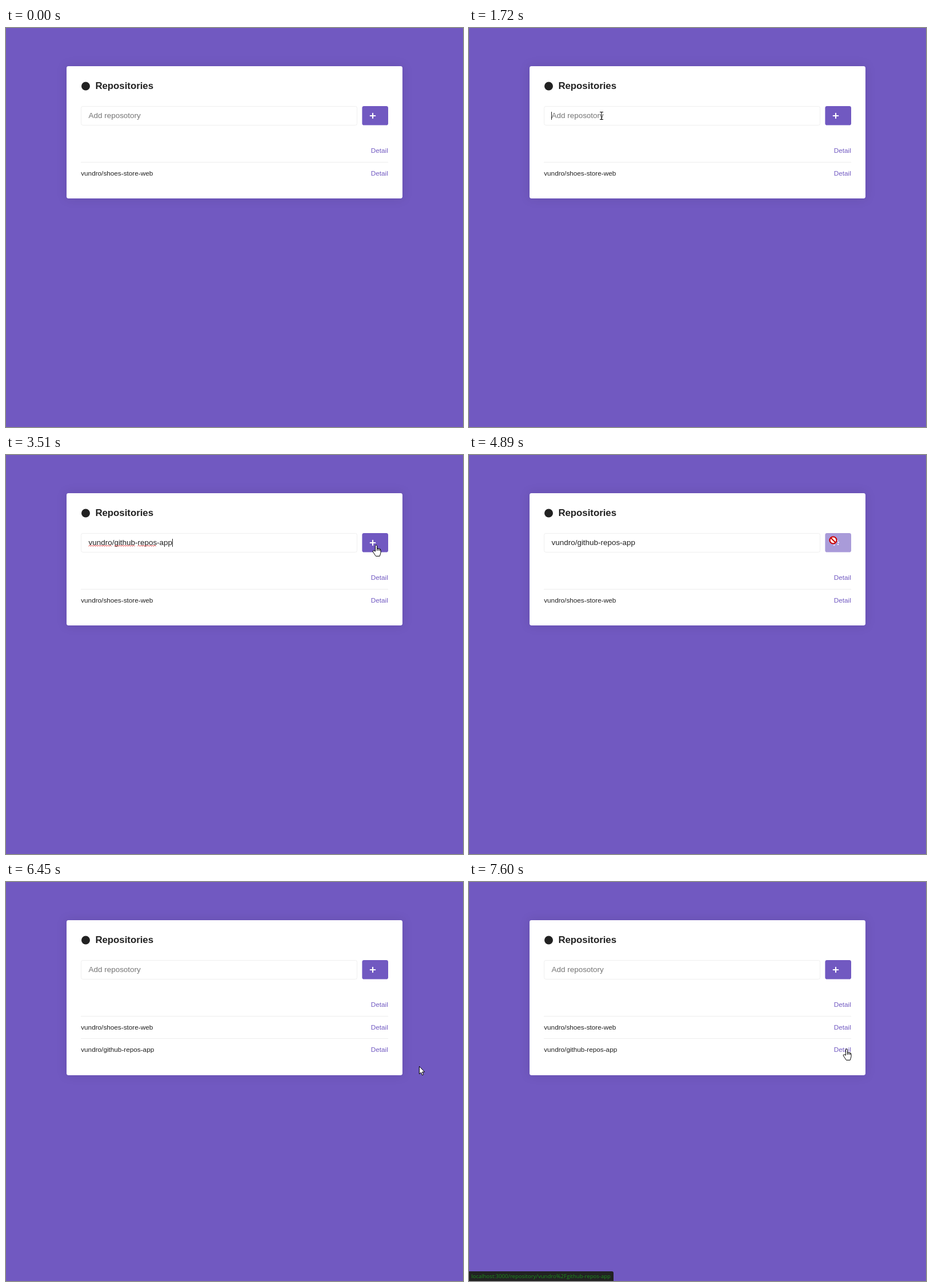
These frames come from a looping animation (800 by 700 pixels, 8000 ms). An HTML page:

```html
<!DOCTYPE html>
<html lang="en">
<head>
<meta charset="utf-8">
<title>Repositories</title>
<style>
  html, body { margin: 0; width: 100%; height: 100%; overflow: hidden; background: #7159c1; }
  svg { display: block; font-family: "Liberation Sans", Arial, sans-serif; fill: #222; }
  #card { fill: #fff; filter: drop-shadow(0 0 8.4px rgba(0, 0, 0, .1)); }
  .title { font-size: 16.8px; font-weight: bold; }
  .field { font-size: 13.44px; }
  .row { font-size: 11.76px; }
  .link, #button { fill: #7159c1; }
  .link { text-anchor: end; }
  .line { fill: #eee; }
  #squiggle { fill: none; stroke: #e33; }
  #pointer path { fill: #fff; stroke: #000; stroke-linejoin: round; }
  #status text { font: 9.55px "Open Sans", "Noto Sans", sans-serif; fill: #1b8c1b; }
</style>
</head>
<body>
<svg width="800" height="700" viewBox="0 0 800 700">
  <rect id="card" x="106" y="67" width="588" rx="3.4"/>
  <circle cx="139.5" cy="102" r="7.5"/>
  <text class="title" x="156.4" y="107">Repositories</text>

  <rect x="131.5" y="137.5" width="483" height="33" rx="3" fill="#fff" stroke="#eee"/>
  <text id="field" class="field" x="144.6" y="158"></text>
  <path id="squiggle"/>
  <rect id="caret" y="147" width="1" height="14"/>

  <g id="submit">
    <rect id="button" x="623.4" y="137" width="45.6" height="33.6" rx="3.4"/>
    <path id="plus" d="M637.7 154h8.6M642 149.7v8.6" stroke="#fff" stroke-width="2.1" stroke-linecap="round"/>
    <g id="spinner" fill="#fff"></g>
  </g>

  <g id="rows"></g>
  <g id="status">
    <path d="M0 683H250a3 3 0 0 1 3 3V700H0Z"/>
    <text x="4" y="695">localhost:3000/repository/vundro%2Fgithub-repos-app</text>
  </g>

  <g id="pointer">
    <path id="arrow" d="M.5 .5V14L3.5 11 5.6 15.8 7.8 14.8 5.7 10.2H9.8Z"/>
    <path id="hand" d="M-1.5 11V1.5a1.5 1.5 0 0 1 3 0V6.3H5.5Q8 7 8 9V13.5L6.2 19.5H-.6L-5.5 12a1.5 1.5 0 0 1 2.4-1.8ZM1.5 6V10M4 6.5V10M6.3 7V10"/>
    <path id="beam" style="fill:none" d="M-3-6.5H3M0-6.5V6.5M-3 6.5H3"/>
    <g id="denied" transform="translate(-.5 -.5)" fill="#fff" stroke="#c00" stroke-width="2.2">
      <circle r="6"/><path d="M-4.2-4.2 4.2 4.2" style="stroke:#c00"/>
    </g>
  </g>
</svg>
<script>
const $ = id => document.getElementById(id);
const show = (id, on) => $(id).style.display = on ? "" : "none";
const LOOP = 8000, STEP = 77, BLINK = 500;
const ENTER = 300, FOCUS = 1240, PASTE = 2270, REFOCUS = 3360;
const BLUR = 4200, FADE = 4350, DONE = 4980, HOVER = 7510;
const REPO = "vundro/github-repos-app";

// Pointer moves: start, end, and the place reached
const moves = [
  [ENTER, 920, 209, 149], [1030, 1090, 232, 154],
  [2580, 2870, 579, 185], [2870, 3190, 665, 157],
  [REFOCUS, 3510, 648, 158], [3510, 3740, 638, 150],
  [5810, 6450, 723, 323], [6450, 6590, 708, 322], [6980, 7450, 661, 293]
];

const wave = (x, end) => {
  let d = `M${x} 160`;
  for (let i = 1; x + i * 2 <= end; i++) d += `l2 ${i % 2 ? -1.5 : 1.5}`;
  return d;
};
$("squiggle").setAttribute("d", wave(144.5, 186) + wave(189.5, 226) + wave(230.5, 264));

// Seven dots, leaving the upper right place empty
for (let i = 0; i < 7; i++)
  $("spinner").innerHTML += `<circle cx="4.9" r="1.1" transform="rotate(${i * 45})"/>`;

$("rows").innerHTML = ["", "vundro/shoes-store-web", REPO].map((name, i) => {
  const y = Math.round(219.3 + 39.4 * i);
  return `<g id="row${i}" class="row">
    ${i ? `<rect class="line" x="131" y="${y - 24}" width="538" height="1"/>` : ""}
    <text x="131.2" y="${y}">${name}</text>
    <text class="link" x="668.8" y="${y}">Detail</text>
  </g>`;
}).join("");

function pointerAt(t) {
  let x = 429, y = 672;
  for (const [from, to, endX, endY] of moves) {
    if (t < from) break;
    const held = Math.floor((t - from) / STEP) * STEP;
    const u = t >= to ? 1 : held / (to - from), ease = u * u * (3 - 2 * u);
    x += (endX - x) * ease;
    y += (endY - y) * ease;
  }
  return [Math.round(x), Math.round(y)];
}

function pointerKind(x, y, busy) {
  const over = (l, top, r, bottom) => x >= l && x <= r && y >= top && y <= bottom;
  if (over(131, 137, 615, 171)) return "beam";
  if (over(623, 137, 669, 171)) return busy ? "denied" : "hand";
  return over(639, 286, 669, 302) ? "hand" : "arrow";
}

function draw(t) {
  const filled = t >= PASTE && t < DONE, busy = t >= BLUR && t < DONE, done = t >= DONE;
  $("card").setAttribute("height", done ? 272 : 232);
  $("field").textContent = filled ? REPO : "Add reposotory";
  $("field").style.fill = filled ? "#222" : "#757575";
  show("squiggle", filled && !busy);
  show("caret", [FOCUS, PASTE, REFOCUS].some(on => t >= on && t < on + BLINK));
  $("caret").setAttribute("x", filled ? 291 : 144);

  $("submit").setAttribute("opacity", busy && t >= FADE ? .6 : 1);
  show("plus", !busy);
  show("spinner", busy);
  $("spinner").setAttribute("transform", `translate(642 154) rotate(${(t - BLUR) * .18})`);
  show("row2", done);
  show("status", t >= HOVER);

  const [x, y] = pointerAt(t), kind = pointerKind(x, y, busy);
  show("pointer", t >= ENTER);
  for (const id of ["arrow", "hand", "beam", "denied"]) show(id, id === kind);
  $("pointer").setAttribute("transform", `translate(${x} ${y})`);
}

const start = performance.now();
function frame() {
  draw((performance.now() - start) % LOOP);
  requestAnimationFrame(frame);
}
frame();
</script>
</body>
</html>
```
